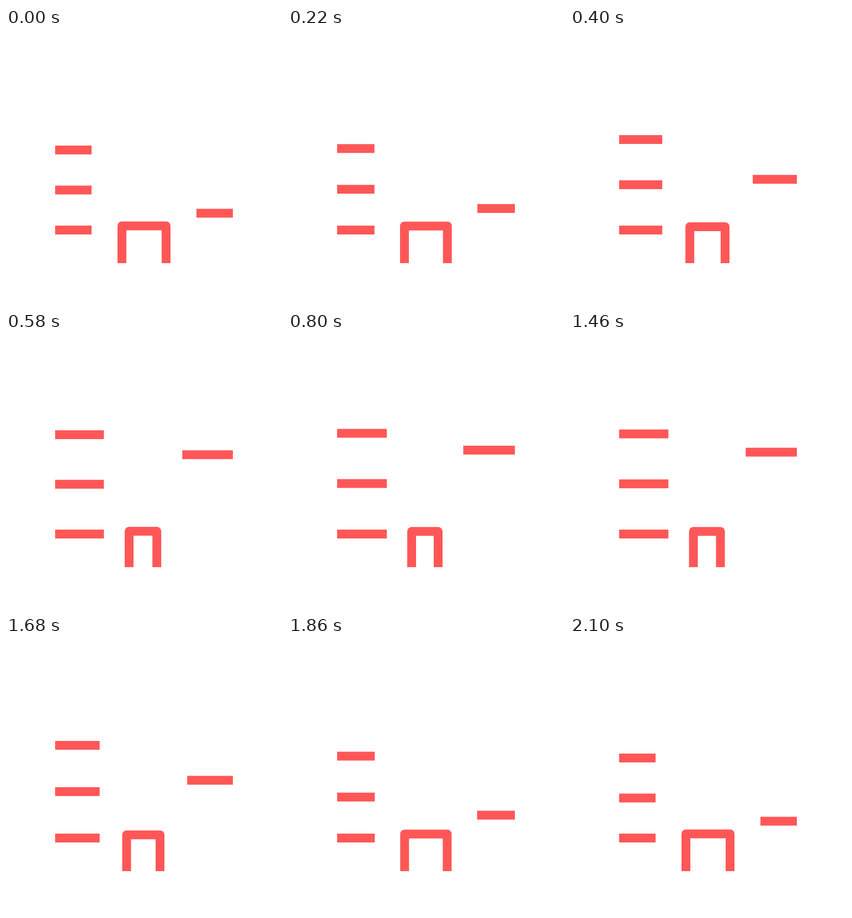
An HTML page for the animation above (3000 ms loop, 500x500 px).

```html
<!DOCTYPE html>
<html lang="en">
<head>
<meta charset="utf-8">
<title>Bars and arch</title>
<style>
  html, body {
    margin: 0;
    width: 100%;
    height: 100%;
    overflow: hidden;
    background: #fff;
  }
  svg {
    display: block;
    width: 100%;
    height: 100%;
  }
  rect, path {
    animation: 3000ms cubic-bezier(.75, 0, .25, 1) infinite;
  }
  rect {
    fill: #ff5757;
    height: 16px;
    animation-name: bar;
  }
  path {
    fill: none;
    stroke: #ff5757;
    stroke-width: 16px;
    stroke-linejoin: round;
    animation-name: arch;
  }

  .left {
    --x0: 89px; --w0: 66px;
    --x1: 89px; --w1: 90px;
  }
  .right {
    --x0: 345px; --w0: 66px;
    --x1: 317.5px; --w1: 93.5px;
  }
  .top { --y0: 213px; --y1: 175.5px; }
  .mid { --y0: 285.5px; --y1: 266.5px; }
  .low { --y0: 358px; --y1: 358px; }
  .right { --y0: 327.5px; --y1: 206px; }

  /* out by 800 ms, hold, back from 1304 to 2104 ms */
  @keyframes bar {
    0%, 70.133%, 100% { x: var(--x0); y: var(--y0); width: var(--w0); }
    26.667%, 43.467% { x: var(--x1); y: var(--y1); width: var(--w1); }
  }
  @keyframes arch {
    0%, 70.133%, 100% { d: path("M210 426 L210 358.5 L290 358.5 L290 426"); }
    26.667%, 43.467% { d: path("M224 426 L224 361.3 L272 361.3 L272 426"); }
  }
</style>
</head>
<body>
<svg viewBox="0 0 500 500">
  <rect class="left top"/>
  <rect class="left mid"/>
  <rect class="left low"/>
  <rect class="right"/>
  <path d="M210 426 L210 358.5 L290 358.5 L290 426"/>
</svg>
</body>
</html>
```
